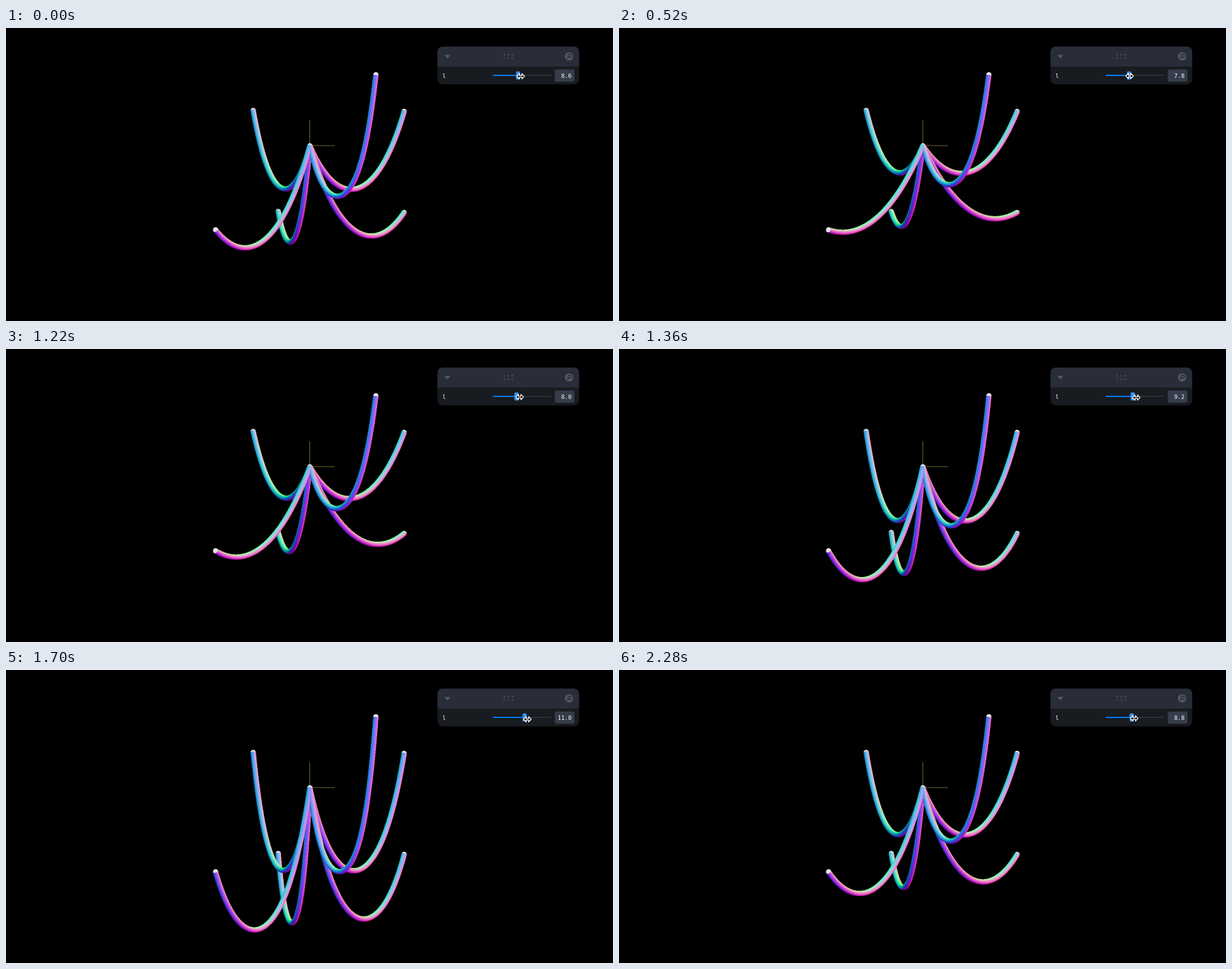
Animation, 960 px wide and 464 px high, one loop 2300 ms. Source, as an HTML page with a canvas:

```html
<!DOCTYPE html>
<html lang="en">
<head>
<meta charset="utf-8">
<title>Catenary tubes</title>
<style>
  html, body { margin: 0; width: 100%; height: 100%; overflow: hidden; background: #000; }
  svg, canvas { position: absolute; }
  svg { left: 0; top: 0; }
  canvas { left: 320px; top: 60px; width: 320px; height: 360px; }
  text { font: 9.1px "DejaVu Sans Mono", monospace; fill: #fefefe; }
</style>
</head>
<body>
<svg width="960" height="464">
  <path d="M480.5 146V186L520 186.5" fill="none" stroke="#6e662a"/>
</svg>
<canvas id="view" width="640" height="720"></canvas>
<svg width="960" height="464">
  <rect x="682.4" y="29.4" width="224" height="59.8" rx="8" fill="#181c20"/>
  <path d="M682.4 60.9V37.4a8 8 0 0 1 8-8h208a8 8 0 0 1 8 8V60.9z" fill="#292d39"/>
  <g fill="#535760">
    <path d="M694.2 42.4h7.6q1 .2.4 1.2l-3.5 4q-.7.7-1.4 0l-3.5-4q-.6-1 .4-1.2z"/>
    <circle cx="890.5" cy="45" r="6.6"/>
  </g>
  <path d="M787 42.3h15M787 47.7h15" stroke="#535760" stroke-width="2" stroke-dasharray="2 4.4"/>
  <g fill="none" stroke="#292d39" stroke-width="1.4">
    <circle cx="891.5" cy="44" r="2.5"/>
    <path d="M889.7 45.8L887 48.5"/>
  </g>
  <text x="690.2" y="78.7">l</text>
  <rect x="770" y="74" width="92.4" height="2" rx=".8" fill="#2c303b"/>
  <rect id="fill" x="770" y="74" height="2" rx=".8" fill="#007bff"/>
  <rect id="knob" y="68.8" width="6.4" height="12.8" rx="1.6" fill="#3c93ff"/>
  <rect x="868" y="65.8" width="31" height="19.2" rx="2.4" fill="#373c4b"/>
  <text id="value" x="894.4" y="78.7" text-anchor="end"></text>
  <path id="cursor" d="M-6 0L-2-4.2V-1.2H2V-4.2L6 0L2 4.2V1.2H-2V4.2z" fill="#000" stroke="#fff" stroke-width="1.3" stroke-linejoin="round"/>
</svg>
<script>
const LOOP = 2300, UNIT = 40, SS = 2, R = 0.1;
const W = 640, H = 720, PX = UNIT * SS;
const OX = 160.5 * SS, OY = 126.5 * SS;

// far ends of the tubes, measured from the shared anchor
const ENDS = [
  [-2.24, 1.4, -6.25], [2.61, 2.81, 3.4], [3.73, 1.36, -5.5],
  [3.73, -2.64, -5.72], [-3.73, -3.33, 5.42], [-1.25, -2.6, -6.28]
];

const $ = id => document.getElementById(id);
const ctx = $('view').getContext('2d');
const image = ctx.createImageData(W, H);
const pixels = new Uint32Array(image.data.buffer);
const depth = new Float32Array(W * H);

const ARC = Array.from({ length: 41 }, (_, i) => [Math.cos(Math.PI * i / 40), Math.sin(Math.PI * i / 40)]);

const progress = (t, from, to) => Math.min(1, Math.max(0, (t - from) / (to - from)));
const smooth = p => p * p * (3 - 2 * p);

// the drag: shorten, lengthen, then speed back to the start
const lengthAt = t => 8.6
  - 1.8 * progress(t, 0, 860) ** 1.6
  + 4.2 * smooth(progress(t, 960, 1680))
  - 2.4 * progress(t, 1700, LOOP) ** 2.58;

// how far the pointer runs ahead of the knob
const leadAt = t => 4
  - 3 * smooth(progress(t, 0, 520))
  + 4.4 * smooth(progress(t, 520, 1450))
  - 4 * smooth(progress(t, 1550, 2000))
  + 2.6 * smooth(progress(t, 2000, LOOP));

function plot(x, y, z, color) {
  const px = Math.floor(OX + x * PX), py = Math.floor(OY - y * PX);
  if (px < 0 || py < 0 || px >= W || py >= H) return;
  const i = py * W + px;
  if (z > depth[i]) { depth[i] = z; pixels[i] = color; }
}

const channel = n => Math.round(127.5 + 127.5 * n);
const normalColor = (x, y, z) => (255 << 24 | channel(z) << 16 | channel(y) << 8 | channel(x)) >>> 0;

function ball(x, y, z) {
  const step = 0.5 / PX;
  for (let u = -R; u <= R; u += step)
    for (let v = -R; v <= R; v += step) {
      const w = R * R - u * u - v * v;
      if (w > 0) plot(x + u, y + v, z + Math.sqrt(w) - 0.004, 0xffe8e4e4);
    }
}

// catenary parameter: solve sinh(u) / u = k
function solve(k) {
  let lo = 1e-3, hi = 12;
  for (let i = 0; i < 50; i++) {
    const u = (lo + hi) / 2;
    if (Math.sinh(u) / u < k) lo = u; else hi = u;
  }
  return lo;
}

function tube([ex, ey, ez], length) {
  const h = Math.hypot(ex, ez);
  const len = Math.max(length, Math.hypot(h, ey) * 1.0007);
  const a = h / 2 / solve(Math.sqrt(len * len - ey * ey) / h);
  const low = h / 2 - a * Math.atanh(ey / len);
  const lowArc = a * Math.sinh(low / a), top = Math.hypot(a, lowArc);
  const dx = ex / h, dz = ez / h, n = Math.ceil(len * PX * 1.5);
  for (let i = 0; i <= n; i++) {
    const s = len * i / n - lowArc, c = Math.hypot(a, s);
    const d = low + a * Math.asinh(s / a);
    const x = d * dx, y = c - top, z = d * dz;
    const tx = dx * a / c, ty = s / c, tz = dz * a / c;
    const flat = Math.hypot(tx, ty) || 1e-6;
    const sx = ty / flat, sy = -tx / flat;
    const fx = -tz * tx / flat, fy = -tz * ty / flat;
    for (const [p, q] of ARC) {
      const nx = sx * p + fx * q, ny = sy * p + fy * q, nz = flat * q;
      plot(x + R * nx, y + R * ny, z + R * nz, normalColor(nx, ny, nz));
    }
  }
  ball(ex, ey, ez);
}

let shown;
function show(length) {
  if (length === shown) return;
  shown = length;
  pixels.fill(0);
  depth.fill(-99);
  ENDS.forEach(end => tube(end, length));
  ball(0, 0, 0);
  ctx.putImageData(image, 0, 0);
  const travel = length * 4.28;
  $('fill').setAttribute('width', travel + 3.2);
  $('knob').setAttribute('x', 770 + travel);
  $('value').textContent = length.toFixed(1);
}

function frame() {
  const t = performance.now() % LOOP;
  const length = lengthAt(t);
  show(Math.round(length * 5) / 5);
  const x = 773.2 + length * 4.28 + leadAt(t), y = 75.3 + (length - 6.8) * 0.65;
  $('cursor').setAttribute('transform', `translate(${x} ${y})`);
  requestAnimationFrame(frame);
}
frame();
</script>
</body>
</html>
```
